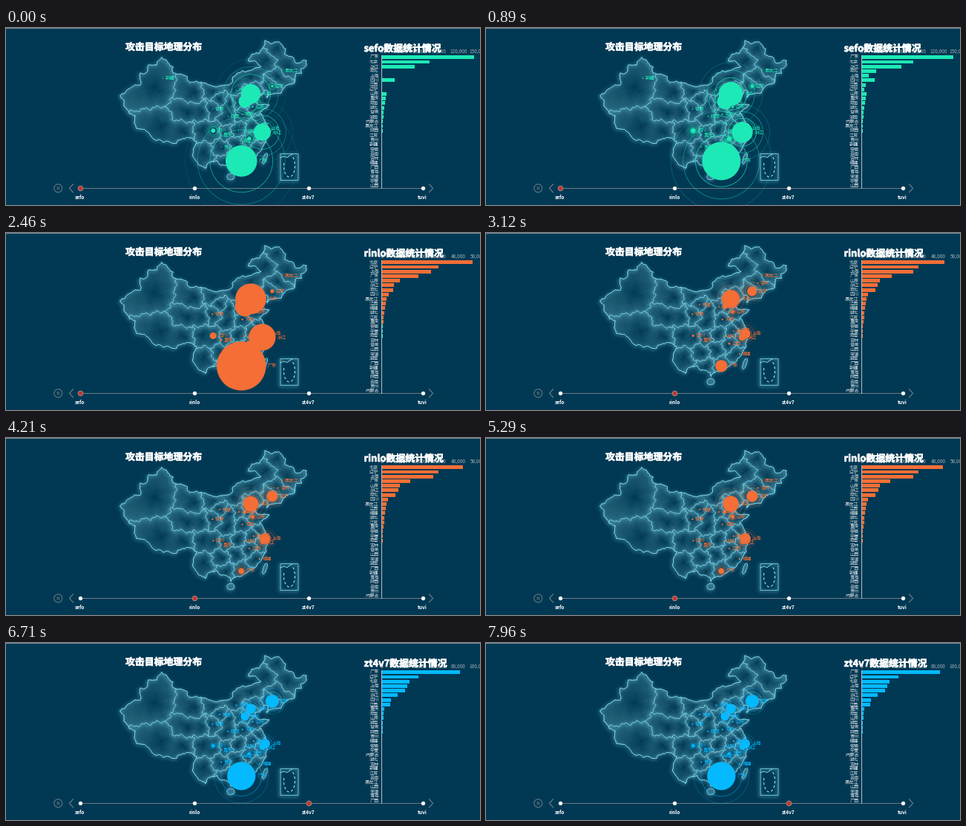
These frames come from a looping animation (639 by 240 pixels, 8 s). A matplotlib script:

```python
import numpy as np
import matplotlib.pyplot as plt
from matplotlib import patheffects
from matplotlib.animation import FuncAnimation
from matplotlib.colors import to_rgba
from matplotlib.path import Path

W, H, DPI = 639, 240, 100
LOOP, INTERVAL = 8000, 50
PX = 72 / DPI
CJK = "Noto Sans CJK JP"
BG, CYAN, GLOW = (1, 57, 84), (147, 235, 248), (128, 217, 248)
GREEN, ORANGE, BLUE = "#1de9b6", "#f46e36", "#04b9ff"
GREY = "#6d7b83"
rng = np.random.default_rng(7)

# ---- map: key points of the outline (lon, lat), capitals, inner seeds ----
OUTLINE = [
    73.5, 39.4, 75.5, 40.6, 80.2, 42.1, 80, 45, 82.4, 45.3, 83, 47.2, 85.5, 47.1,
    87.2, 49.1, 88.9, 48.1, 91, 46.6, 90.9, 45.2, 95.4, 44.3, 96.4, 42.7,
    101.8, 42.5, 105, 41.6, 110.1, 42.6, 112, 45.1, 116, 45.7, 119.8, 46.7,
    118, 48, 115.6, 48.1, 116.7, 49.8, 119.3, 50.1, 120.8, 52, 121, 53.3,
    125.5, 53, 127.5, 49.8, 130.5, 48.9, 131, 47.7, 134.7, 48.3, 133.1, 45.1,
    131, 44.8, 130.7, 42.6, 128, 42, 124.3, 40, 121.6, 38.9, 122, 40.5,
    121, 40.9, 118.9, 39.1, 117.7, 39, 119, 37.3, 122.5, 37.2, 119.3, 35.1,
    121.9, 31.6, 120.9, 30.4, 122, 29.8, 119.7, 25.6, 117.1, 23.6, 110.4, 21.2,
    110, 20.4, 109.8, 21.5, 106.7, 22, 105.4, 23.2, 102.3, 22.5, 101.5, 21.2,
    99.2, 22.2, 97.6, 24, 98.7, 28, 95.3, 29, 92, 27.5, 88, 27.8, 84.2, 28.8,
    79, 31.2, 78.5, 34.5, 76, 35.9, 74.9, 38.3, 73.5, 39.4]
CITY = {
    "广东": (113.3, 23.1), "北京": (116.4, 39.9), "浙江": (120.15, 30.3),
    "河北": (114.5, 38), "上海": (121.2, 31.2), "四川": (104.07, 30.67),
    "江西": (115.9, 28.7), "辽宁": (123.4, 41.8), "山东": (117, 36.65),
    "重庆": (106.55, 29.56), "河南": (113.65, 34.76), "湖北": (114.3, 30.6),
    "甘肃": (103.8, 36.06), "湖南": (113, 28.2), "内蒙古": (111.65, 40.8),
    "黑龙江": (126.6, 45.75), "陕西": (108.95, 34.27), "江苏": (118.8, 32.05),
    "贵州": (106.7, 26.6), "新疆": (87.6, 43.8), "安徽": (117.3, 31.85),
    "云南": (102.7, 25), "吉林": (125.3, 43.9), "福建": (119.3, 26.1),
    "广西": (108.3, 22.8), "青海": (101.8, 36.6), "天津": (117.2, 39.1),
    "宁夏": (106.2, 38.5), "山西": (112.55, 37.87)}
# seeds for provinces whose capital lies far from the middle
HEART = {
    "新疆": [(85, 41.3)], "西藏": [(87, 31.8), (94.5, 30.5)],
    "青海": [(95.5, 35.5), (100.5, 35.5)], "甘肃": [(97.5, 40), (103.8, 36.1)],
    "内蒙古": [(104, 40.7), (111, 41.6), (116.5, 44.2), (121, 48)],
    "黑龙江": [(128.3, 46.8), (125, 51.5)], "四川": [(100.8, 30.8), (104.5, 30.3)],
    "重庆": [(108, 30.2)], "云南": [(101.3, 25)], "福建": [(118.2, 26)],
    "陕西": [(108.7, 34), (109.3, 37.3)], "河北": [(115.2, 38), (117.3, 41)],
    "山东": [(117.5, 36.4), (120, 36.8)], "江苏": [(119.5, 33.3)],
    "湖南": [(111.7, 27.5)], "湖北": [(112.3, 31)]}


def project(pts):
    p = np.reshape(np.asarray(pts, float), (-1, 2))
    return np.column_stack([330 + (p[:, 0] - 116.4) * 4.114,
                            89.3 + (39.9 - p[:, 1]) * 5.42])


def rough(p, amp=0.11):
    """Make a polyline wiggle like a real border."""
    for _ in range(3):
        size = np.hypot(*(p[1:] - p[:-1]).T)[:, None]
        mid = (p[1:] + p[:-1]) / 2 + rng.normal(0, amp, (len(p) - 1, 2)) * size
        out = np.empty((2 * len(p) - 1, 2))
        out[::2], out[1::2] = p, mid
        p = out
    return p


def island(x, y, rx, ry, lean):
    a = np.linspace(0, 2 * np.pi, 13)
    dx, dy = rx * np.cos(a), ry * np.sin(a)
    return rough(np.column_stack([x + dx - lean * dy, y + dy]))


def blur(a, sigma):
    x = np.arange(-9, 10)
    k = np.exp(-x ** 2 / (2 * sigma ** 2))
    k /= k.sum()
    for axis in (0, 1):
        a = np.apply_along_axis(np.convolve, axis, a, k, mode="same")
    return a


def halve(a):
    return a.reshape(H, 2, W, 2).mean((1, 3))


def edges(ids):
    e = np.zeros(ids.shape, bool)
    dx, dy = ids[:, 1:] != ids[:, :-1], ids[1:] != ids[:-1]
    e[:, 1:] |= dx
    e[:, :-1] |= dx
    e[1:] |= dy
    e[:-1] |= dy
    return e


coast = rough(project(OUTLINE))
islands = [island(303, 201.5, 5.2, 4.5, 0), island(349, 177, 2.6, 7.5, 0.3)]


def backdrop():
    yy, xx = (np.mgrid[:2 * H, :2 * W] + 0.5) / 2
    grid = np.column_stack([xx.ravel(), yy.ravel()])
    wx = xx + 1.5 * np.sin(yy * 0.42) + 0.9 * np.sin(yy * 0.9 + xx * 0.35)
    wy = yy + 1.5 * np.sin(xx * 0.38) + 0.9 * np.sin(xx * 0.8 - yy * 0.4)

    # each province is the area nearest to its seeds
    ids = np.zeros(xx.shape, int)
    near, second = np.full(xx.shape, 999.0), np.full(xx.shape, 999.0)
    for n, name in enumerate({**CITY, **HEART}):
        seeds = project(HEART.get(name) or [CITY[name]])
        d = np.min([np.hypot(wx - x, wy - y) for x, y in seeds], axis=0)
        second = np.minimum(second, np.maximum(near, d))
        ids[d < near] = n
        near = np.minimum(near, d)

    land = Path(coast).contains_points(grid).reshape(xx.shape)
    ids[~land] = -1
    for n, p in enumerate(islands):
        inside = Path(p).contains_points(grid).reshape(xx.shape)
        land |= inside
        ids[inside] = 50 + n
    ids[(abs(xx - 382) < 12.2) & (abs(yy - 188.5) < 18)] = 60

    ink = halve(edges(ids))
    fill = halve(0.25 * land * 2 * near / (near + second))
    glow = np.clip(blur(np.roll(ink, (1, -1), (0, 1)), 2.4) * 1.15, 0, 0.4)
    img = np.ones((H, W, 3)) * BG
    for alpha, color in ((fill, CYAN), (glow, GLOW), (ink * 0.68, CYAN)):
        img += alpha[..., None] * (np.array(color) - img)
    img[0] = 122, 140, 150
    img[217, 100:562] = 109, 123, 131
    return img.astype(np.uint8)


# ---- data series ----
def tail(head):
    """Let the ranking fade out after its leading values."""
    return np.append(head, head[-1] * 0.83 ** np.arange(1, 30 - len(head)))


def series(name, color, step, scale, rows, head):
    rows, widths = rows.split(), tail(head)
    size = np.maximum(widths * scale, 1.1) * (np.arange(29) < 20)
    by_city = dict(zip(rows, size))
    return dict(name=name, color=color, step=step, rows=rows, widths=widths,
                radii=np.array([by_city[c] for c in CITY]))


DATA = [
    series("sefo", GREEN, 30000, 0.27,
           "广东 北京 浙江 河北 上海 四川 江西 辽宁 山东 重庆 河南 湖北 甘肃 湖南 内蒙古 "
           "黑龙江 陕西 江苏 贵州 新疆 安徽 云南 吉林 福建 广西 青海 天津 宁夏 山西",
           [123, 77, 67, 50, 25, 17, 16, 10, 7]),
    series("rinlo", ORANGE, 10000, 0.095,
           "北京 辽宁 上海 广东 山东 浙江 河北 四川 黑龙江 江西 福建 湖北 江苏 重庆 安徽 "
           "宁夏 河南 吉林 甘肃 山西 天津 湖南 广西 新疆 青海 陕西 云南 贵州 内蒙古",
           [110, 77, 70, 39, 25, 23, 19, 9]),
    series("zt4v7", BLUE, 20000, 0.18,
           "广东 辽宁 北京 上海 河北 浙江 四川 江西 重庆 河南 山东 湖南 甘肃 陕西 贵州 "
           "福建 安徽 宁夏 内蒙古 湖北 吉林 新疆 江苏 云南 黑龙江 山西 天津 青海 广西",
           [106, 50, 38, 35, 32, 22, 13, 11.5, 4]),
]
NAMES = [d["name"] for d in DATA] + ["tuvi"]
FIRST = tail([125, 65, 45, 0, 0, 18, 0, 0, 7])
SWITCH = [-735, 2420, 5440]      # title and colours change
MORPH = [580, 2570, 5480]        # bars and circles start to move
HOLD, TICK = 580, 153.75         # opening pause, then the screen's refresh

# ---- static scene ----
fig = plt.figure(figsize=(W / DPI, H / DPI), dpi=DPI)
ax = fig.add_axes([0, 0, 1, 1])
ax.imshow(backdrop(), extent=(0, W, H, 0), interpolation="nearest", aspect="auto")
ax.set(xlim=(0, W), ylim=(H, 0))
ax.axis("off")


def line(pts, color, lw=1.0, **kw):
    p = np.asarray(pts, float)
    ax.plot(p[:, 0], p[:, 1], color=color, lw=lw * PX, **kw)


def text(x, y, s, size, color="white", ha="left", **kw):
    return ax.text(x, y, s, fontsize=size * PX, color=color, ha=ha, va="center",
                   family=CJK, **kw)


def heading(x, y, s):
    fat = [patheffects.withStroke(linewidth=0.45, foreground="white")]
    return text(x, y, s, 12.9, weight="bold", zorder=9, path_effects=fat)


cyan = np.array(CYAN) / 255
line(coast, cyan, 0.7, alpha=0.5)
a = np.linspace(-0.9, 3.5, 60)
line(np.column_stack([382 + 7.5 * np.cos(a), 187 + 15 * np.sin(a)]), cyan, 1.1,
     dashes=(3, 2.6))
line([(370, 176), (374, 174), (379, 175.5), (383, 172.5), (386, 171)], cyan, 0.8)

line([(506, 36.5), (506, 217)], "#b4bcc1", zorder=5)
heading(161, 26, "攻击目标地理分布")
title = heading(482.5, 28, "")

MARKS = [99.7, 253.7, 407.7, 561.7]
BASE = 217.3
for x, d in ((90.5, -5), (570.5, 5)):
    line([(x, BASE - 5.5), (x + d, BASE), (x, BASE + 5.5)], GREY, 1.2)
ax.scatter([70.3], [BASE], s=(11 * PX) ** 2, facecolors="none", edgecolors=GREY,
           linewidths=PX)
for x in (69.3, 71.3):
    line([(x, BASE - 1.7), (x, BASE + 1.7)], GREY, 0.9, snap=False)
ax.scatter(MARKS, [BASE] * 4, s=(5.4 * PX) ** 2, color="white", linewidths=0,
           zorder=6)
active = ax.scatter([MARKS[0]], [BASE], s=(6.6 * PX) ** 2, facecolors="#c23531",
                    edgecolors="#a08580", linewidths=PX, zorder=7)
for x, name in zip(MARKS, NAMES):
    text(x, 229, name, 6.6, ha="center", weight="bold")

# ---- moving parts ----
ROW_Y = 39.8 + 6.21 * np.arange(29)
ticks = [text(506 + 26 * i, 31.5, "", 6.4, "#a4aeb4", "center") for i in range(6)]
rows = [text(502.5, y, "", 6.2, "#d0d6da", "right") for y in ROW_Y]
bars = ax.barh(ROW_Y, np.ones(29), height=4.9, left=506, linewidth=0, zorder=4)
spots = project(list(CITY.values()))
rings = ax.scatter([], [], facecolors="none", linewidths=0.8 * PX, zorder=5)
dots = ax.scatter(spots[:, 0], spots[:, 1], linewidths=0, zorder=6)
tags = [text(0, 0, c, 6.2, zorder=7) for c in CITY]


def draw(i):
    t = (i + 0.5) * INTERVAL
    t = 0 if t < HOLD else HOLD + (t - HOLD) // TICK * TICK
    k = sum(t >= s for s in SWITCH) - 1
    d, last = DATA[k], DATA[k - 1]
    fresh = k > 0 and t < SWITCH[k] + 120
    color = d["color"]
    ease = 1 - (1 - np.clip((t - MORPH[k]) / 1000, 0, 1)) ** 3

    w0 = last["widths"] if k else FIRST
    r0 = last["radii"] if k else d["radii"] * 0.64
    widths = w0 + (d["widths"] - w0) * ease
    radii = np.where(d["radii"] > 0, r0 + (d["radii"] - r0) * ease, 0)

    title.set_text(d["name"] + "数据统计情况")
    for n, tick in enumerate(ticks):
        tick.set_text(f"{n * d['step']:,}")
    for n, (bar, row) in enumerate(zip(bars, rows)):
        row.set_text(d["rows"][n])
        bar.set_width(widths[n])
        late = fresh and 14 <= n <= 21
        bar.set_facecolor(last["color"] if late else color)

    dots.set_sizes((2 * radii * PX) ** 2)
    dots.set_facecolor(color)
    for tag, (x, y), r in zip(tags, spots, radii):
        tag.set_visible(r > 0)
        tag.set_position((x + r + 2.5, y))
        tag.set_color(color)

    # three ripples per large circle, each growing to 2.5 times its size
    big = d["radii"] >= 2
    phase = ((t - SWITCH[k]) / 4000 + np.arange(3) / 3) % 1
    rgba = np.tile(to_rgba(color), (3 * big.sum(), 1))
    rgba[:, 3] = 0 if fresh else np.repeat(0.8 * (1 - phase), big.sum())
    size = np.outer(1 + 1.5 * phase, d["radii"][big]).ravel()
    rings.set_offsets(np.tile(spots[big], (3, 1)))
    rings.set_sizes((2 * size * PX) ** 2)
    rings.set_edgecolor(rgba)

    mark = sum(t >= s + 120 for s in SWITCH) - 1
    active.set_offsets([(MARKS[mark], BASE)])
    return ()


anim = FuncAnimation(fig, draw, frames=LOOP // INTERVAL, interval=INTERVAL,
                     init_func=lambda: draw(0), repeat=True, repeat_delay=0,
                     blit=False)
plt.show()
```
